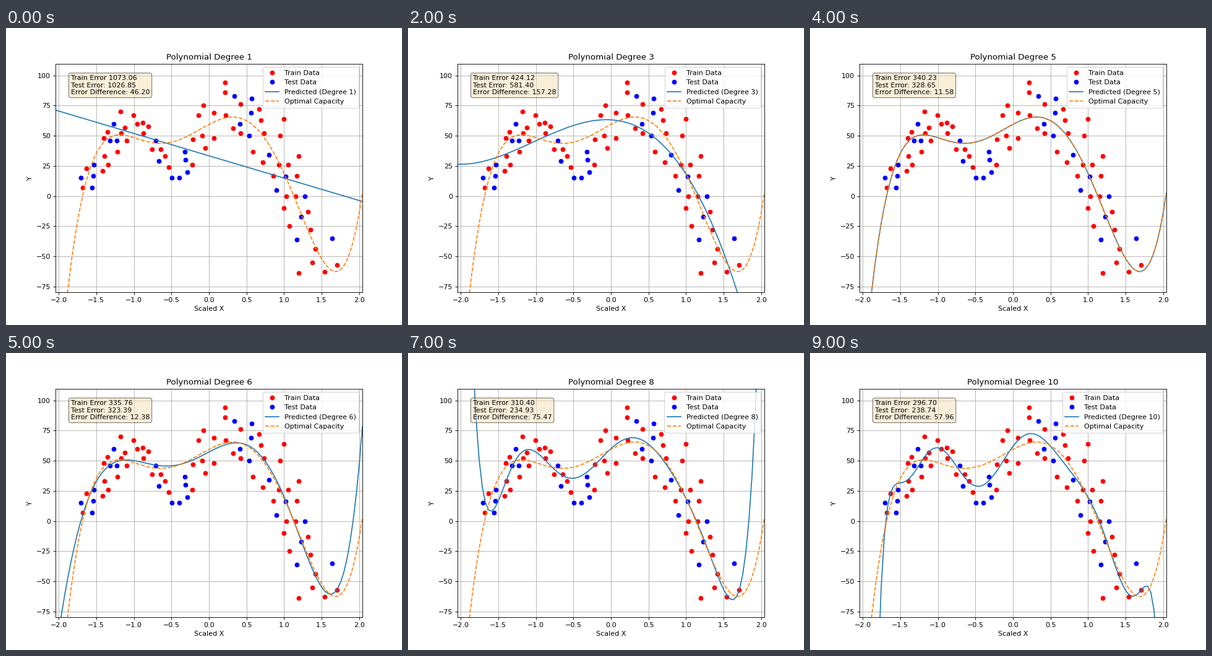
A matplotlib script that plays this animation: 640x480 px, repeating every 10000 ms.

```python
import numpy as np
import matplotlib.pyplot as plt
from matplotlib.animation import FuncAnimation

DEGREES = 10
OPTIMAL = 5

# Raw samples (x, y); everything else is worked out from them
TRAIN = np.array([
    (124, 7), (130, 23), (156, 21), (158, 48), (159, 33), (164, 53),
    (165, 26), (180, 37), (185, 70), (186, 52), (192, 57), (195, 46),
    (206, 67), (212, 60), (221, 61), (222, 52), (230, 58), (236, 39),
    (250, 39), (257, 33), (263, 24), (301, 26), (302, 47), (311, 67),
    (317, 50), (319, 75), (322, 40), (336, 69), (336, 48), (354, 94),
    (354, 86), (355, 67), (367, 56), (379, 76), (379, 52), (399, 37),
    (409, 72), (412, 63), (415, 28), (417, 52), (432, 17), (441, 26),
    (443, 50), (449, 64), (449, -10), (453, 0), (456, 26), (458, -25),
    (468, 0), (470, 17), (473, 33), (473, -64), (488, -13), (492, -28),
    (495, -55), (500, -44), (515, -63), (534.7, -57),
])
TEST = np.array([
    (121.3, 15), (139, 7), (141, 17), (142, 26), (168, 46), (174, 60),
    (179, 46), (242, 46), (247, 29), (268, 15), (280, 15), (289, 37),
    (290, 30), (293, 20), (369, 83), (378, 60), (393, 50), (396, 69),
    (397, 81), (425, 34), (437, 5), (452, 16), (470, -36), (477, -17),
    (483, 0), (527, -35),
])


def padded(values):
    """Limits with a tenth of the range added at each end."""
    pad = 0.1 * np.ptp(values)
    return values.min() - pad, values.max() + pad


def mse(model, x, y):
    return np.mean((np.polyval(model, x) - y) ** 2)


raw_x, all_y = np.concatenate([TRAIN, TEST]).T
all_x = (raw_x - raw_x.mean()) / raw_x.std()
train_x, test_x = np.split(all_x, [len(TRAIN)])
train_y, test_y = np.split(all_y, [len(TRAIN)])

grid_x = np.linspace(*padded(all_x), 100)
models = [np.polyfit(train_x, train_y, d) for d in range(1, DEGREES + 1)]

fig, ax = plt.subplots(figsize=(8, 6), dpi=80)
ax.plot(train_x, train_y, "ro", label="Train Data")
ax.plot(test_x, test_y, "bo", label="Test Data")
curve, = ax.plot(grid_x, np.polyval(models[0], grid_x), color="#1f77b4",
                 label="Predicted (Degree 1)")
ax.plot(grid_x, np.polyval(models[OPTIMAL - 1], grid_x), "--",
        color="#ff7f0e", label="Optimal Capacity")
ax.set_xlim(padded(all_x))
ax.set_ylim(padded(all_y))
ax.set_xlabel("Scaled X")
ax.set_ylabel("Y")
ax.grid(True)
title = ax.set_title("")
legend = ax.legend(loc="upper right")
note = ax.text(0.05, 0.95, "", transform=ax.transAxes, va="top",
               bbox=dict(boxstyle="round", facecolor="wheat", alpha=0.5))


def update(frame):
    model = models[frame]
    degree = frame + 1
    train_err = mse(model, train_x, train_y)
    test_err = mse(model, test_x, test_y)
    curve.set_ydata(np.polyval(model, grid_x))
    title.set_text(f"Polynomial Degree {degree}")
    legend.get_texts()[2].set_text(f"Predicted (Degree {degree})")
    note.set_text(f"Train Error {train_err:.2f}\n"
                  f"Test Error: {test_err:.2f}\n"
                  f"Error Difference: {abs(train_err - test_err):.2f}")
    return curve, title, legend, note


anim = FuncAnimation(fig, update, frames=DEGREES, interval=1000,
                     init_func=lambda: update(0), repeat=True, repeat_delay=0)
plt.show()
```
